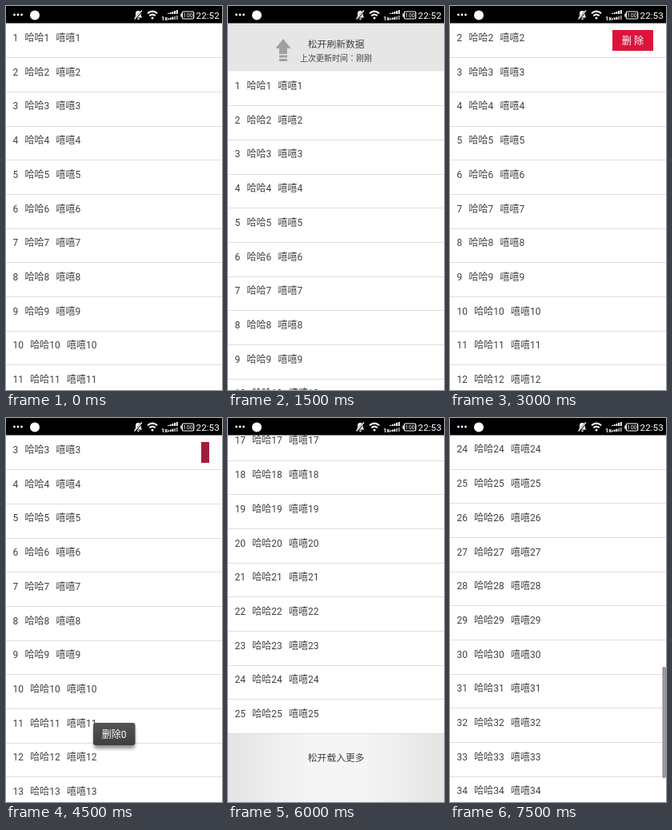
An HTML page for the animation above (9000 ms loop, 270 by 480 pixels).

```html
<!DOCTYPE html>
<html lang="zh-CN">
<head>
<meta charset="utf-8">
<title>列表刷新</title>
<style>
  html, body { margin: 0; width: 100%; height: 100%; overflow: hidden; background: #fff; }
  svg { display: block; width: 100%; height: 100%; }
  text { font-family: Roboto, "Noto Sans CJK SC", "Noto Sans CJK", sans-serif; font-size: 12px; fill: #404040; white-space: pre; }
  .light { fill: #fff; }
  .mid { text-anchor: middle; }
</style>
</head>
<body>
<svg viewBox="0 0 270 480">
  <defs>
    <linearGradient id="panel">
      <stop offset="0" stop-color="#e4e4e4"/>
      <stop offset=".38" stop-color="#f5f5f5"/>
      <stop offset=".62" stop-color="#f5f5f5"/>
      <stop offset="1" stop-color="#e4e4e4"/>
    </linearGradient>
    <linearGradient id="toastFill" x2="0" y2="1">
      <stop offset="0" stop-color="#555"/>
      <stop offset="1" stop-color="#3e3e3e"/>
    </linearGradient>
    <filter id="soft" x="-20%" y="-30%" width="140%" height="180%">
      <feGaussianBlur stdDeviation="2"/>
    </filter>
  </defs>

  <g id="screens"></g>

  <g id="statusBar">
    <rect width="270" height="21.5"/>
    <g fill="#fff">
      <circle cx="10.5" cy="11" r="1.4"/><circle cx="15" cy="11" r="1.4"/><circle cx="19.5" cy="11" r="1.4"/>
      <circle cx="36" cy="11.5" r="6"/>
      <path d="M160.5 14.5 162 12.5V9.5a3.4 3.4 0 0 1 6.8 0v3l1.5 2zM164 15.5h3a1.5 1.5 0 0 1-3 0z"/>
      <circle cx="183" cy="15" r="1.5"/>
    </g>
    <path d="M161 16.5 170 6" stroke="#000" stroke-width="2.6"/>
    <path d="M160.5 16.5 170 5.5" stroke="#fff" stroke-width="1.2"/>
    <path d="M177 9.3q6-5.2 12 0M179.3 12.3q3.7-3.2 7.4 0" fill="none" stroke="#fff" stroke-width="2.1"/>
    <text x="194" y="18" class="light" style="font-size:7.5px;font-weight:700">1x</text>
    <g id="signal" fill="#fff"></g>
    <rect x="220.3" y="7" width="14.4" height="9" rx="1.5" fill="none" stroke="#fff" stroke-width="1.2"/>
    <rect x="218.3" y="9.5" width="1.5" height="4" fill="#fff"/>
    <text x="227.5" y="14.3" class="light mid" style="font-size:7.5px">100</text>
    <text id="clock" x="237.6" y="16" class="light" style="font-size:11.7px"></text>
  </g>
</svg>
<script>
const HOLD = 1500, PITCH = 42.7, DIGIT = 6.8, GAP = 8.2;
const $ = id => document.getElementById(id);

const rect = (x, y, w, h, fill, extra = '') =>
  `<rect x="${x}" y="${y}" width="${w}" height="${h}" fill="${fill}" ${extra}/>`;
const text = (x, y, str, size = 12, cls = '') =>
  `<text x="${x}" y="${y}" class="${cls}" style="font-size:${size}px">${str}</text>`;

function row(n, shift) {
  const digits = String(n).length * DIGIT;
  const laugh = 8.5 + digits + GAP, giggle = laugh + 24 + digits + GAP;
  const base = 44 + shift;
  return text(8.5, base, n) + text(laugh, base, '哈哈' + n) + text(giggle, base, '嘻嘻' + n)
    + rect(0, Math.round(64.15 + shift), 270, 1, '#dedede');
}

function list(first, offset, count) {
  let out = '';
  for (let i = 0; i < count; i++) out += row(first + i, offset + i * PITCH);
  return out;
}

const header = () => rect(0, 21, 270, 60.5, '#e6e6e6')
  + '<path d="M69 41 78.5 53H74v7h-10v-7h-4.5zM64 61.5h10v3H64zM64 66h10v3H64z" fill="#a0a0a0"/>'
  + text(99.8, 52.3, '松开刷新数据', 11.8)
  + text(90, 69, '上次更新时间<tspan lang="zh-TW" font-family="Noto Sans CJK TC, sans-serif">：</tspan>刚刚', 10);

const deleteButton = () => rect(203, 30, 51, 26, '#dc143c')
  + text(228.5, 48.2, '删 除', 12.2, 'light mid');

const toast = () => rect(110, 385, 51, 28, '#000', 'rx="3" opacity=".45" filter="url(#soft)"')
  + rect(109, 381, 52.5, 28, 'url(#toastFill)', 'rx="3"')
  + text(135.2, 399.7, '删除0', 12, 'light mid');

const footer = () => rect(0, 395, 270, 85, 'url(#panel)') + text(99.8, 428.8, '松开载入更多', 11.8);

const scrollbar = () => rect(266, 311.5, 3.5, 138, '#a0a0a0', 'rx="1" stroke="#777" stroke-width=".8"');

const screens = [
  { clock: '22:52', body: list(1, 0, 11) },
  { clock: '22:52', body: header() + list(1, 60, 10) },
  { clock: '22:53', body: list(2, 0, 11) + deleteButton() },
  { clock: '22:53', body: list(3, 0, 11) + rect(244, 30, 10, 26, '#a01c38') + toast() },
  { clock: '22:53', body: list(17, -11.6, 9) + footer() },
  { clock: '22:53', body: list(24, -.6, 11) + scrollbar() }
];

// Two stacked rows of rising signal bars
for (let i = 0; i < 5; i++) {
  const x = 202 + i * 2.7;
  $('signal').innerHTML += rect(x, 10 - (1 + i), 1.9, 1 + i, '#fff')
    + rect(x, 17 - (1.5 + i * .9), 1.9, 1.5 + i * .9, i < 3 ? '#fff' : '#999');
}

$('screens').innerHTML = screens.map(s => `<g>${s.body}</g>`).join('');
const groups = [...$('screens').children];
const start = performance.now();
let shown = -1;

function draw() {
  const step = Math.floor((performance.now() - start) / HOLD) % screens.length;
  if (step !== shown) {
    shown = step;
    groups.forEach((g, i) => g.style.display = i === step ? '' : 'none');
    $('clock').textContent = screens[step].clock;
  }
  requestAnimationFrame(draw);
}
draw();
</script>
</body>
</html>
```
